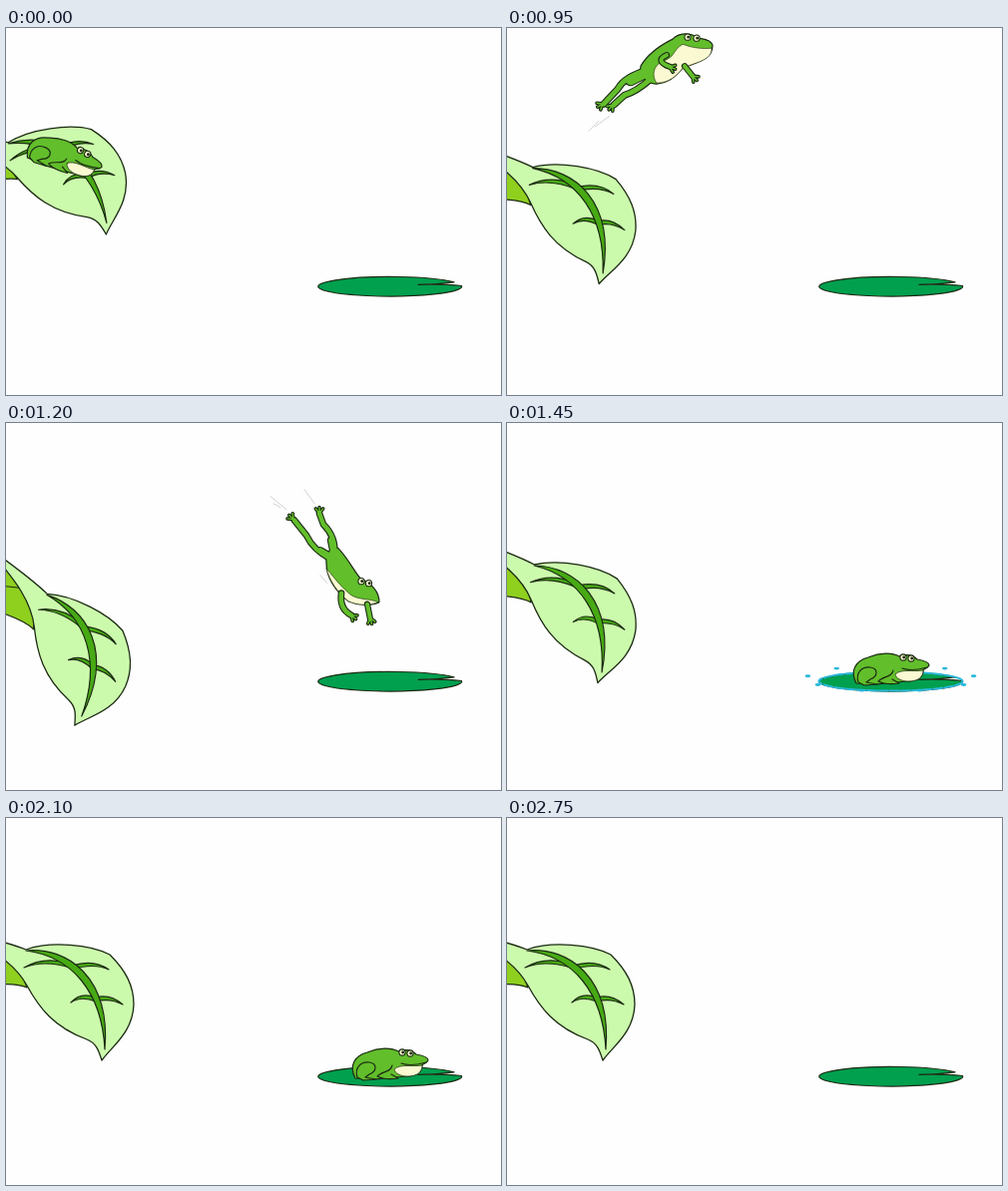
Animation of 496 by 368 pixels, one loop 2.95 s. Source, as an HTML page:

```html
<!DOCTYPE html>
<html lang="en">
<head>
<meta charset="utf-8">
<title>Leaping frog</title>
<style>
html, body { margin: 0; width: 100%; height: 100%; overflow: hidden; background: #fefefe; }
svg { display: block; width: 100vw; height: 100vh; }
</style>
</head>
<body>
<svg id="stage" viewBox="0 0 496 368" stroke-linecap="round" stroke-linejoin="round"></svg>
<script>
const LOOP = 2950, STEP = 50;
const LAUNCH = 800, TURNOVER = 1050, LAND = 1300, LEAVE = 2150, GONE = 2350;
const INK = '#1b2a12', SKIN = '#62be2b', CREAM = '#fbf9d2', BLADE = '#ccfaad', VEIN = '#47aa14', WATER = '#2ab8da';
const stage = document.getElementById('stage');

const shape = (d, fill = 'none', width = 1.2, stroke = INK) =>
  `<path d="${d}" fill="${fill}" stroke="${stroke}" stroke-width="${width}"/>`;

// ---- frog ----
const ball = (x, y, r, fill) =>
  `<circle cx="${x}" cy="${y}" r="${r}" fill="${fill}" stroke="${INK}" stroke-width="1.1"/>`;
const eye = (x, y) => ball(x, y, 3.1, CREAM) + ball(x + .7, y, .9, INK);
const lid = (x, y) => ball(x, y, 3.1, SKIN) + shape(`M${x - 2.5} ${y + .8}h5`);

// three short toes fanned around a direction
function toes(x, y, deg) {
  return [-38, 0, 38].map(spread => {
    const a = (deg + spread) * Math.PI / 180;
    return `M${x} ${y}l${6 * Math.cos(a)} ${6 * Math.sin(a)}`;
  }).join('');
}

const strokes = (limbs, extra, color) =>
  limbs.map(([d, w]) => shape(d, 'none', w + extra, color)).join('');
const outlined = limbs => strokes(limbs, 2.2, INK) + strokes(limbs, 0, SKIN);

function stretchedFrog({ body, belly, legs, arms, eyes, trails }) {
  return shape(trails, 'none', 1, '#d2d2d2') +
    strokes(legs, 2.2, INK) + shape(body, SKIN) + strokes(legs, 0, SKIN) +
    shape(belly, CREAM, .6) + outlined(arms) + eyes;
}

const rising = stretchedFrog({
  body: 'M206 17C204 11 196 11 192 10C184 4 172 4 166 11C152 18 141 26 134 38C132 48 140 56 150 56C162 55 170 48 176 40C190 34 206 32 206 17Z',
  belly: 'M205 20C196 21 186 20 176 16C166 22 168 30 156 33C146 38 145 48 150 55C162 55 170 48 176 40C190 34 206 32 205 20Z',
  legs: [
    ['M142 42Q118 48 111 61L97 76', 5], ['M142 43L124 52', 10],
    ['M144 51Q129 64 118 67L107 77', 5],
    [toes(96, 76, 150), 1.5], [toes(106, 77, 130), 1.5]
  ],
  arms: [
    ['M160 27Q147 33 164 39', 4], [toes(163, 39, 20), 1.4],
    ['M178 38L186 48', 4], [toes(186, 48, 45), 1.4]
  ],
  eyes: eye(181, 9) + eye(190, 10),
  trails: 'M82 103L92 93M88 99L103 88'
});

const diving = stretchedFrog({
  body: 'M374 179C366 183 352 182 343 178C330 168 321 154 321 140C320 128 327 122 333 125C345 138 349 149 356 156C366 160 374 168 374 179Z',
  belly: 'M373 179C362 183 352 182 343 178C332 169 324 157 321 145C330 156 338 166 346 172C354 177 364 175 373 179Z',
  legs: [
    ['M329 131Q331 114 318 101L314 90', 4.5], ['M329 132L326 117', 6],
    ['M326 136Q308 127 301 112L289 97', 4.5], ['M327 134L315 127', 5],
    [toes(314, 90, -90), 1.4], [toes(288, 96, -135), 1.4]
  ],
  arms: [
    ['M336 170Q334 186 346 192', 4.5], [toes(346, 192, 40), 1.4],
    ['M362 181L365 196', 4], [toes(365, 195, 75), 1.4]
  ],
  eyes: eye(356, 158) + eye(363.5, 160),
  trails: 'M265 73L281 86M268 80L275 84M299 66L309 80M315 152L322 160'
});

const sitting =
  shape('M350 261C343 248 350 238 362 235C374 230 386 230 393 234C402 231 408 234 411 237C417 238 423 240 423 243C421 247 418 246 417 248C417 255 412 259 400 259C390 260 378 261 370 262Z', SKIN) +
  shape('M417 248C417 255 412 259 402 259C395 259 390 256 389 252C395 246 408 250 417 248Z', CREAM, .7) +
  shape('M396 246C404 249 414 247 421 245') +
  shape('M352 260C349 250 356 244 364 245C372 246 372 254 364 257L360 260L371 262L358 263Z', SKIN) +
  shape('M387 248C386 255 376 254 372 259C378 262 386 262 393 261L386 257', SKIN) +
  eye(397, 235) + eye(405, 236) +
  `<g id="lids">${lid(397, 235) + lid(405, 236)}</g>`;

// ---- leaf ----
// side vein: a crescent that tapers from the midrib out to its tip
const sideVein = (tx, ty, bx, by, rx, ry) =>
  shape(`M${tx} ${ty}Q${bx} ${by - 2} ${rx} ${ry - 2}v4Q${bx} ${by + 2} ${tx} ${ty}Z`, VEIN);

const leaf =
  shape('M21 170C8 164 -20 166 -60 172V112L10 140Z', '#8fd01f') +
  shape('M-45 148L-8 137', 'none', 1) +
  shape('M-60 110C-25 118 5 126 20 132C45 123 85 127 104 137C120 153 128 168 128 187C127 215 107 228 96 243C93 234 91 226 81 222C48 210 33 190 21 168C10 148 -10 132 -60 110Z', BLADE, 1.3) +
  sideVein(18, 150, 38, 140, 64, 148) + sideVein(103, 152, 88, 143, 66, 150) +
  sideVein(65, 185, 75, 176, 90, 182) + sideVein(117, 187, 104, 178, 90, 182) +
  shape('M20 133C62 129 105 160 99 232C96 174 66 139 20 133Z', VEIN);

// ---- scene ----
const pad = 'M456.5 258.5A72 9.8 0 1 1 449 254.8Q432 257 413 257.3Q440 256.8 456.5 258.5Z';
stage.innerHTML =
  `<rect width="496" height="368" fill="#fefefe"/><g id="leaf">${leaf}</g>` +
  shape(pad, '#00a04f') +
  `<ellipse id="ring" cx="384.5" cy="259" rx="72" ry="9.6" fill="none" stroke="${WATER}" stroke-width="2" stroke-dasharray="9 2"/>` +
  `<g id="drops"></g><g id="sit">${sitting}</g><g id="rise">${rising}</g><g id="dive">${diving}</g>`;

const el = id => document.getElementById(id);
const show = (id, on) => el(id).setAttribute('display', on ? 'inline' : 'none');
const move = (id, value) => el(id).setAttribute('transform', value);
const clamp = u => Math.min(Math.max(u, 0), 1);

// ---- motion ----
// the leaf is kicked down by the jump, then eases back to rest
function leafAngle(t) {
  const raised = -12.4, lowest = 33, bottom = 1100;
  if (t < bottom) return raised + (lowest - raised) * clamp((t - LAUNCH) / (bottom - LAUNCH)) ** 1.4;
  return lowest * (1 - clamp((t - bottom) / 750)) ** 2.65;
}

// a jump is a parabola around its highest point
const leap = { time: 990, x: 188, y: 36 };
const exit = { time: 2300, x: 530, y: 148 };

function fly(id, jump, t, level, cx, cy) {
  const dt = t - jump.time;
  const x = jump.x + .7 * dt, y = jump.y + .0026 * dt * dt;
  move(id, `translate(${x} ${y}) rotate(${.18 * (t - level)}) translate(${-cx} ${-cy})`);
}

function splash(t) {
  const u = (t - LAND) / 400, on = u >= 0 && u <= 1;
  show('ring', on && u < .6);
  show('drops', on);
  if (!on) return;
  const count = 9, reach = 66 + 30 * Math.sqrt(u), size = 4 * (1 - .8 * u);
  el('drops').innerHTML = Array.from({ length: count }, (_, i) => {
    const a = (190 + i * 360 / count) * Math.PI / 180;
    const x = 384.5 + reach * Math.cos(a), y = 255 + 13 * Math.sin(a) + 7 * u * u;
    return `<ellipse cx="${x}" cy="${y}" rx="${size}" ry="${size / 2}" fill="${WATER}"/>`;
  }).join('');
}

function render(t) {
  move('leaf', `rotate(${leafAngle(t)} -68 205)`);

  const onLeaf = t < LAUNCH, onPad = t >= LAND && t < LEAVE;
  show('sit', onLeaf || onPad);
  move('sit', onLeaf ? 'translate(78 125) rotate(21) translate(-401 -236)' : '');
  show('lids', t >= 550 && t < 650);

  const leaving = t >= LEAVE && t < GONE;
  show('rise', t >= LAUNCH && t < TURNOVER || leaving);
  show('dive', t >= TURNOVER && t < LAND);
  if (leaving) fly('rise', exit, t, 2250, 160, 40);
  else fly('rise', leap, t, 950, 160, 40);
  fly('dive', leap, t, 1200, 335, 150);

  splash(t);
}

const start = performance.now();
function tick() {
  const t = (performance.now() - start) % LOOP;
  render(Math.floor(t / STEP) * STEP);
  requestAnimationFrame(tick);
}
tick();
</script>
</body>
</html>
```
